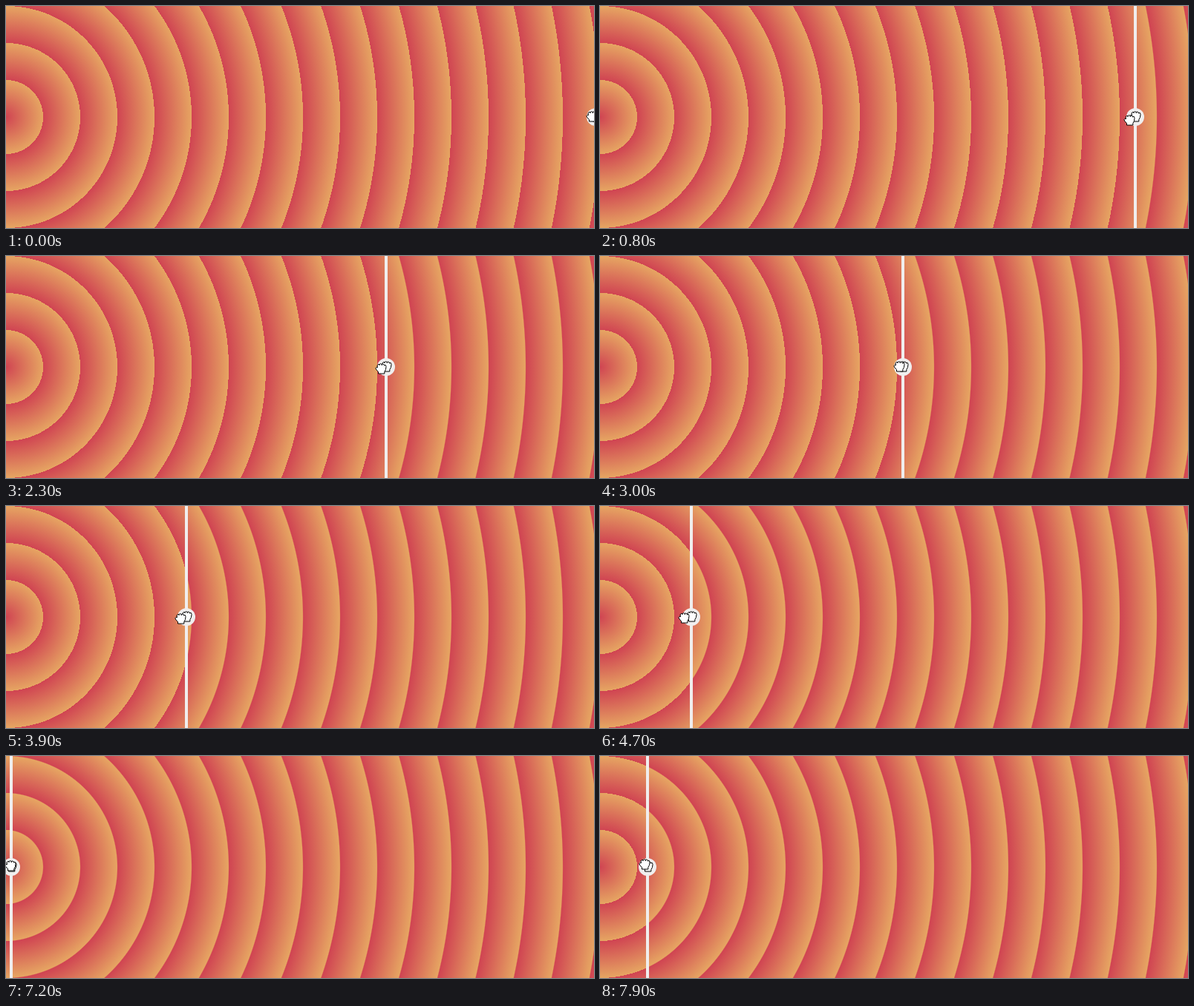
Recreate the animation shown at these times as an HTML page with a canvas. Size 792x300 px, loop 8000 ms.

```html
<!DOCTYPE html>
<html lang="en">
<head>
<meta charset="utf-8">
<title>Comparison slider</title>
<style>
  html, body { margin: 0; width: 100%; height: 100%; overflow: hidden; }
  canvas { display: block; }
</style>
</head>
<body>
<canvas id="stage" width="792" height="300"></canvas>
<script>
const ctx = document.getElementById('stage').getContext('2d');
const W = 792, H = 300, MID = 149;
const LOOP = 8000, STEP = 100, DRAG_END = 6000, RETURN_START = 7000;
const RING = 50, RINGS = 17;
const RED = '#d04452', ORANGE = '#e6a562', HANDLE = '#f0eeee';

// [time, x] of the handle as it is dragged left, held and pulled back
const path = [[0, 794], [900, 709], [1600, 610], [3000, 408], [3900, 243],
  [4700, 123], [DRAG_END, 2], [RETURN_START, 2], [7900, 64]];

const slope = (a, b) => (b[1] - a[1]) / (b[0] - a[0]);

function tangent(i) {
  if (i === 0) return 0;
  const before = slope(path[i - 1], path[i]);
  if (i === path.length - 1) return before;
  const after = slope(path[i], path[i + 1]);
  return before * after <= 0 ? 0 : 2 * before * after / (before + after);
}

// Monotone cubic interpolation
function handleX(t) {
  const next = path.findIndex(k => k[0] > t);
  if (next < 0) return path[path.length - 1][1];
  const a = path[next - 1], b = path[next], span = b[0] - a[0];
  const u = (t - a[0]) / span, v = 1 - u;
  return a[1] * (1 + 2 * u) * v * v + b[1] * u * u * (3 - 2 * u)
    + span * u * v * (tangent(next - 1) * v - tangent(next) * u);
}

// The pointer sways around the handle while dragging
function pointerOffset(t) {
  if (t < DRAG_END) {
    const u = t / DRAG_END, sway = Math.sin(2 * Math.PI * u) ** 2;
    return [-5 - 5 * sway, 11 * (1 - u) * sway];
  }
  const back = Math.max(0, (t - RETURN_START) / (LOOP - RETURN_START));
  return [-5 * back, -3 * back];
}

function ringGradient(softness) {
  const size = RING * RINGS;
  const gradient = ctx.createRadialGradient(0, H / 2, 0, 0, H / 2, size);
  for (let r = 0; r < size; r += RING) {
    gradient.addColorStop((r && r + softness) / size, RED);
    gradient.addColorStop((r + RING - softness) / size, ORANGE);
  }
  return gradient;
}

const crisp = ringGradient(0), smooth = ringGradient(0.6);

const fist = new Path2D('M-3.5 7V4.5Q-7 1.5-7-.5Q-6.5-2.2-4.5-1.5L-5-4Q-4-6.5-2-5.4' +
  'Q-.5-7.4 1.2-5.6Q3-7 4.4-4.8Q7-5.5 7-2.5Q7 2 4.8 4.5V7Z');
const creases = new Path2D('M-2-5.4V-4M1.2-5.6V-4M4.4-4.8V-3.6');

function drawHand(x, y) {
  ctx.save();
  ctx.translate(Math.round(x), Math.round(y));
  ctx.fillStyle = '#fff';
  ctx.strokeStyle = '#000';
  ctx.lineJoin = 'round';
  ctx.fill(fist);
  ctx.stroke(fist);
  ctx.stroke(creases);
  ctx.restore();
}

function draw(t) {
  const x = Math.round(handleX(t)), [dx, dy] = pointerOffset(t);
  ctx.fillStyle = crisp;
  ctx.fillRect(0, 0, x, H);
  ctx.fillStyle = smooth;
  ctx.fillRect(x, 0, W - x, H);
  ctx.fillStyle = HANDLE;
  ctx.fillRect(x - 2, 0, 4, H);
  ctx.beginPath();
  ctx.arc(x, H / 2, 12, 0, Math.PI * 2);
  ctx.fill();
  drawHand(x, MID);
  drawHand(x + dx, MID + dy);
}

function tick() {
  const t = performance.now() % LOOP;
  draw(Math.floor(t / STEP) * STEP);
  requestAnimationFrame(tick);
}
tick();
</script>
</body>
</html>
```
